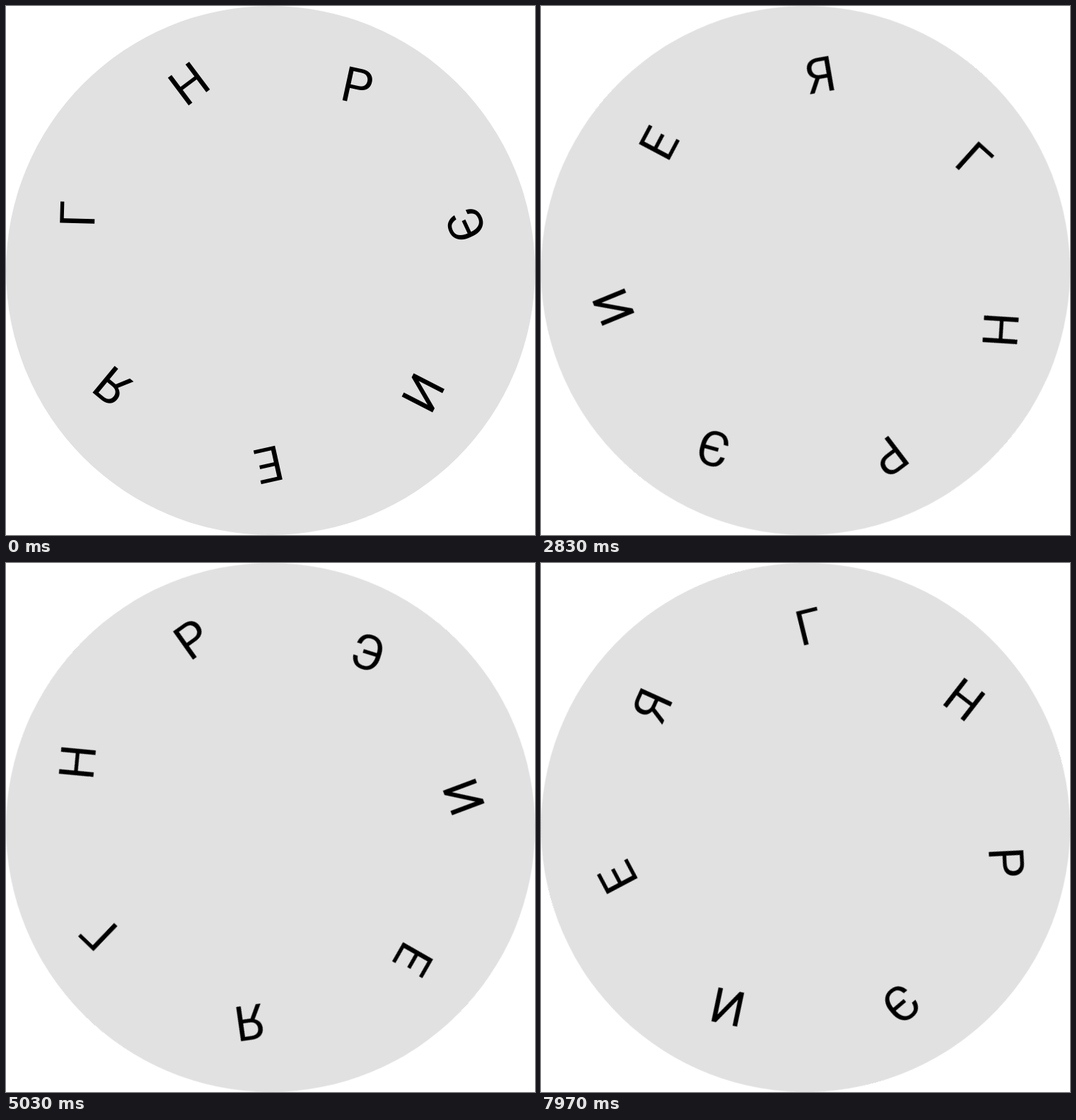
An HTML page that plays this animation: 748x748 px, repeating every 8 s.

```html
<!DOCTYPE html>
<html lang="ru">
<head>
<meta charset="utf-8">
<title>Letter wheel</title>
<style>
  html, body { margin: 0; width: 100%; height: 100%; overflow: hidden; background: #fff; }
  svg { display: block; width: 100%; height: 100%; }
  text { font: 400 68.8px Roboto, sans-serif; fill: #000; }
  /* 30 poses per second, 2.7 degrees each */
  #wheel { animation: spin 8s steps(240) -4ms infinite; }
  @keyframes spin {
    from { transform: rotate(0deg); }
    to { transform: rotate(-648deg); }
  }
</style>
</head>
<body>
<svg viewBox="-374 -374 748 748">
  <g id="wheel"><circle r="374" fill="#e1e1e1"/></g>
</svg>
<script>
  const FONT_SIZE = 68.8;
  const CAP_HEIGHT = 0.711 * FONT_SIZE;

  // letter, bearing from the hub, distance from the hub, tilt (degrees, clockwise from up)
  const letters = [
    ['Р', 25.38, 288.9, 12.3],
    ['Э', 76.72, 283.4, 65],
    ['И', 128.6, 276.4, 117.2],
    ['Е', 180.7, 274.9, 167.4],
    ['Я', 233.5, 276.9, 219.6],
    ['Г', 286.7, 285, 271.5],
    ['Н', 336.45, 288.4, 323.1]
  ];

  const wheel = document.getElementById('wheel');
  const pen = document.createElement('canvas').getContext('2d');
  pen.font = `400 ${FONT_SIZE}px Roboto, sans-serif`;

  // Offset that puts the middle of the visible glyph at zero
  function inkOffset(letter) {
    const box = pen.measureText(letter);
    return (box.actualBoundingBoxLeft - box.actualBoundingBoxRight) / 2;
  }

  for (const [letter, bearing, distance, tilt] of letters) {
    const text = document.createElementNS(wheel.namespaceURI, 'text');
    text.textContent = letter;
    text.setAttribute('x', inkOffset(letter));
    text.setAttribute('y', CAP_HEIGHT / 2);
    text.setAttribute('transform',
      `rotate(${bearing}) translate(0 ${-distance}) rotate(${tilt - bearing})`);
    wheel.append(text);
  }
</script>
</body>
</html>
```
